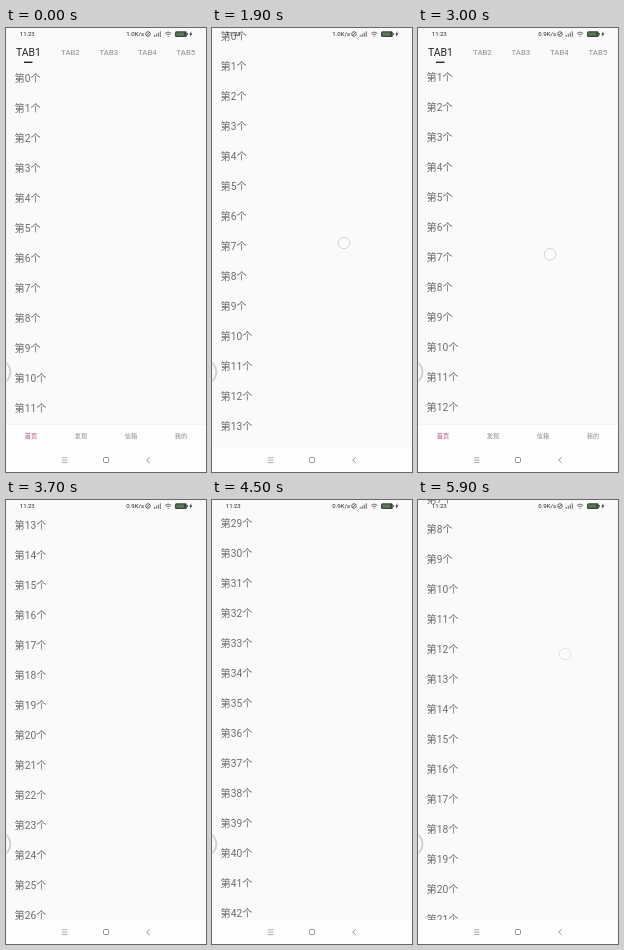
These frames come from a looping animation (200 px wide and 444 px high, 6 s). An HTML page:

```html
<!DOCTYPE html>
<html lang="zh-CN">
<head>
<meta charset="utf-8">
<title>Scrolling list with hiding bars</title>
<style>
  html, body { margin: 0; width: 100%; height: 100%; overflow: hidden; background: #fafafa; }
  svg { display: block; width: 100%; height: 100%; }
  text { font-family: Roboto, "Noto Sans CJK SC", "Noto Sans CJK JP", sans-serif; }
  #list { font-size: 10.2px; fill: #6c6c6c; }
  #tabs, #menu { text-anchor: middle; fill: #8b8b8b; }
  #tabs { font-size: 7.8px; }
  #tabs .on { font-size: 10.4px; fill: #222; }
  #menu { font-size: 6.2px; }
  #menu .on { fill: #b8407f; }
  #status { font-size: 6px; fill: #222; }
  .line { fill: none; stroke: #777; stroke-width: .8; }
</style>
</head>
<body>
<svg viewBox="0 0 200 444">
  <rect width="200" height="444" fill="#fafafa"/>
  <g id="list"></g>

  <g id="header">
    <rect width="200" height="36" fill="#fafafa"/>
    <g id="tabs"></g>
    <rect x="18" y="33.6" width="8.5" height="1.4" fill="#222"/>
  </g>

  <g id="footer">
    <rect y="397" width="200" height="24" fill="#fdfdfd"/>
    <path d="M0 396.7H200" stroke="#eee" stroke-width=".8"/>
    <g id="menu"></g>
  </g>

  <rect y="420" width="200" height="24" fill="#fdfdfd"/>
  <g class="line">
    <path d="M55.8 429.8h5.6M55.8 432.2h5.6M55.8 434.6h5.6" stroke="#999"/>
    <rect x="97.5" y="429.5" width="5" height="5" rx="1"/>
    <path d="M143.7 429.4l-3 2.8 3 2.8"/>
  </g>

  <g id="status">
    <text x="13.8" y="8.3">11:23</text>
    <text id="speed" x="138" y="8.3" text-anchor="end"></text>
    <g class="line" style="stroke:#444">
      <circle cx="142" cy="6" r="2.3"/>
      <path d="M140.4 7.5l3.2-3"/>
      <path d="M148.3 8.8v-1.8M150.3 8.8v-3M152.3 8.8v-4.2M154.3 8.8v-5.5"/>
      <path d="M159.2 5.3q3-2.6 6 0M160.4 6.8q1.8-1.4 3.6 0M161.7 8.4h1"/>
    </g>
    <rect x="169" y="3.2" width="11.8" height="5.8" rx="1.5" fill="#3d443d"/>
    <rect x="170.2" y="4.4" width="8" height="3.4" rx=".6" fill="#587a55"/>
    <rect x="181" y="5" width=".8" height="2.2" fill="#444"/>
    <path d="M185.4 3.2l-2 3.2h1.3l-.7 2.6 2.4-3.5h-1.4z"/>
  </g>

  <path d="M1.2 335.5Q7.6 344 1.2 352.5" fill="none" stroke="#d2d2d2" stroke-width="2" stroke-linecap="round"/>
  <circle id="touch" r="5.8" fill="#fcfcfd" stroke="#cdd0d6" stroke-width=".9"/>
</svg>

<script>
const LOOP = 6000, STEP = 100, ROW = 30, HEADER = 36, FOOTER = 24;
const $ = id => document.getElementById(id);

// [time, value] points
const scroll = [[1500, 0], [1700, 14], [1900, 42], [2100, 74], [2300, 95], [2400, 99],
  [2600, 66], [2800, 28], [2950, 20], [3100, 52], [3300, 160], [3500, 300], [3700, 415],
  [3900, 520], [4100, 660], [4300, 800], [4500, 897], [4600, 900], [4700, 810],
  [4900, 540], [5100, 351], [5300, 230], [5500, 165], [5600, 172], [5750, 220], [5900, 261]];
const hidden = [[1600, 0], [1900, 1], [2400, 1], [2700, 0], [3000, 0], [3300, 1],
  [4600, 1], [4900, 0], [5500, 0], [5750, 1]];

// A finger moves with the list: y = base - scroll
const drags = [
  { from: 1600, to: 3300, x: 132, base: 257 },
  { from: 4600, to: 4800, x: 140, base: 1020 },
  { from: 5500, to: 6000, x: 147, base: 415 }
];

function valueAt(points, t) {
  const i = points.findIndex(p => p[0] > t);
  if (i < 0) return points[points.length - 1][1];
  if (i === 0) return points[0][1];
  const [t0, a] = points[i - 1], [t1, b] = points[i];
  return a + (b - a) * (t - t0) / (t1 - t0);
}

function addText(parent, str, x, y, on) {
  const el = document.createElementNS(parent.namespaceURI, "text");
  el.textContent = str;
  el.setAttribute("x", x);
  el.setAttribute("y", y);
  if (on) el.setAttribute("class", "on");
  parent.append(el);
}

const shift = (id, x, y) => $(id).setAttribute("transform", `translate(${x} ${y})`);

for (let i = 0; i < 50; i++) addText($("list"), `第${i}个`, 8.6, 54 + i * ROW);
[22.5, 64.4, 102.8, 141.3, 179.8].forEach((x, i) =>
  addText($("tabs"), "TAB" + (i + 1), x, i ? 26.8 : 27.8, !i));
["首页", "发现", "信箱", "我的"].forEach((s, i) =>
  addText($("menu"), s, 25 + i * 50, 410.3, !i));

function draw(now) {
  const t = Math.floor(now % LOOP / STEP) * STEP;
  const s = valueAt(scroll, t), h = valueAt(hidden, t);
  shift("list", 0, -s);
  shift("header", 0, -h * HEADER);
  shift("footer", 0, h * FOOTER);
  $("speed").textContent = t < 3000 ? "1.0K/s" : "0.9K/s";

  const drag = drags.find(d => t >= d.from && t < d.to);
  $("touch").style.display = drag ? "" : "none";
  if (drag) {
    shift("touch", drag.x, drag.base - s);
    $("touch").style.opacity = t < 5500 ? 1 : .6;
  }
}

const start = performance.now();
function tick() {
  draw(performance.now() - start);
  requestAnimationFrame(tick);
}
tick();
</script>
</body>
</html>
```
